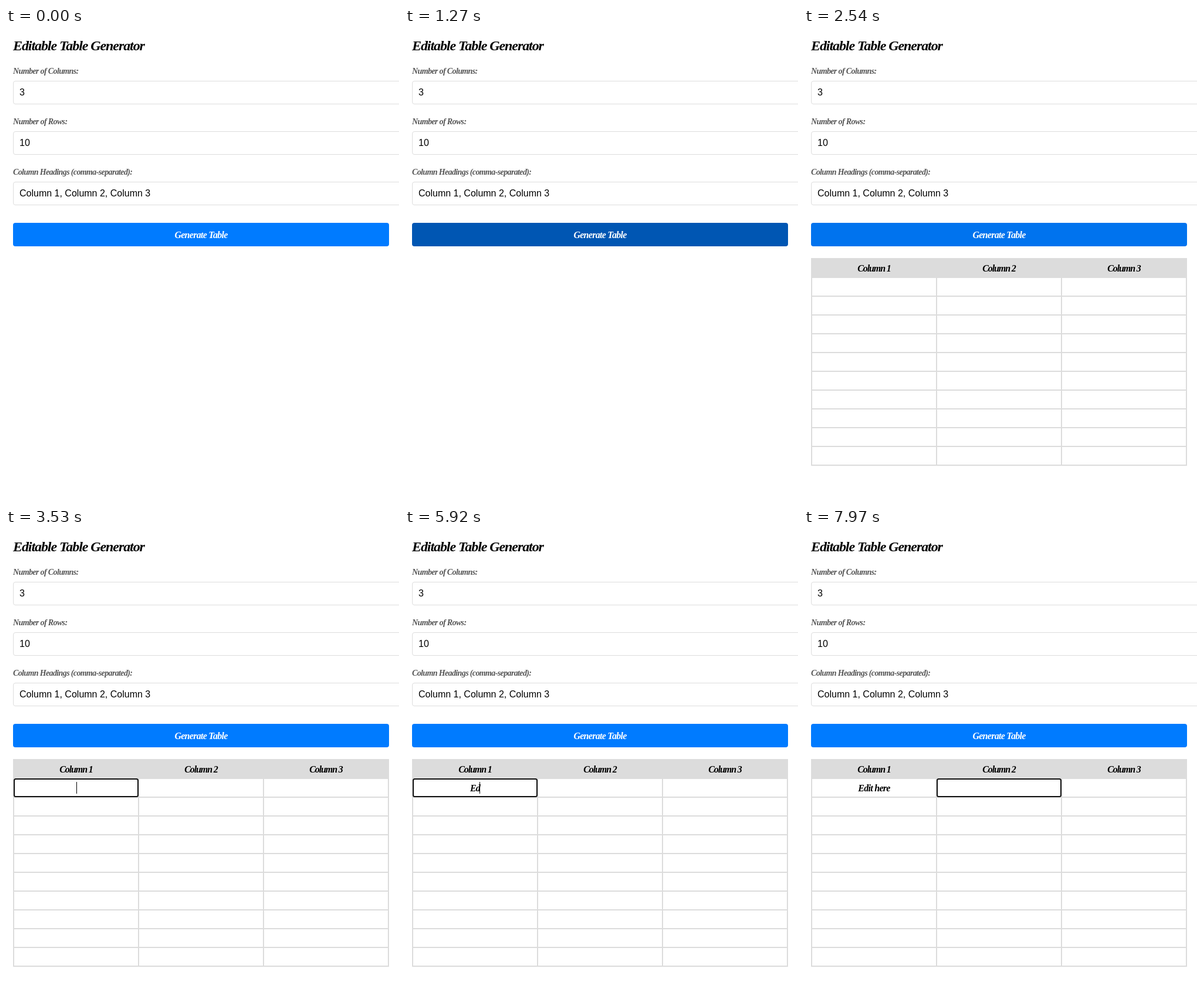
These frames come from a looping animation (670x806 px, 8000 ms). An HTML page:

```html
<!DOCTYPE html>
<html lang="en">
<head>
<meta charset="utf-8">
<title>Editable Table Generator</title>
<style>
  html, body { margin: 0; width: 100%; height: 100%; overflow: hidden; background: #fff; }
  svg { display: block; width: 670px; height: 806px; }
  text { white-space: pre; }
  .script { font: italic bold 16px "Liberation Serif", serif; letter-spacing: -.045em; }
  .script.title { font-size: 24px; }
  .script.label { font-size: 14px; fill: #555; }
  .script.head { letter-spacing: -.07em; }
  .value { font: 16px "Liberation Sans", Arial, sans-serif; }
  .mid { text-anchor: middle; }
</style>
</head>
<body>
<svg id="stage" viewBox="0 0 670 806"></svg>
<script>
const LOOP = 8000;
const stage = document.getElementById('stage');

function add(tag, attrs, parent = stage, text = '') {
  const el = document.createElementNS('http://www.w3.org/2000/svg', tag);
  for (const key in attrs) el.setAttribute(key, attrs[key]);
  el.textContent = text;
  parent.appendChild(el);
  return el;
}
const write = (cls, x, y, text, parent, fill = '#000') =>
  add('text', { class: cls, x, y, fill }, parent, text);
const show = (el, on) => el.setAttribute('visibility', on ? 'visible' : 'hidden');

// Form
write('script title', 12, 38, 'Editable Table Generator');
[
  ['Number of Columns:', '3'],
  ['Number of Rows:', '10'],
  ['Column Headings (comma-separated):', 'Column 1, Column 2, Column 3']
].forEach(([label, value], i) => {
  const y = 86 * i;
  write('script label', 12, y + 78, label);
  add('rect', { x: 12.5, y: y + 90.5, width: 700, height: 39, rx: 3.5, fill: '#fff', stroke: '#ddd' });
  write('value', 23, y + 115, value);
});
const button = add('rect', { x: 12, y: 332, width: 641, height: 40, rx: 4 });
write('script mid', 332.5, 358, 'Generate Table', stage, '#fff');

// Table
const table = add('g', {});
add('rect', { x: 12, y: 392, width: 641, height: 34, fill: '#dcdcdc' }, table);
let grid = '';
for (let c = 0; c < 4; c++) grid += `M${13 + 213 * c} 425V746`;
for (let r = 1; r <= 10; r++) grid += `M12 ${425 + 32 * r}H653`;
add('path', { d: grid, stroke: '#dcdcdc', 'stroke-width': 2 }, table);
for (let c = 0; c < 3; c++) write('script head mid', 119.5 + 213 * c, 415, `Column ${c + 1}`, table);
const cell = write('script mid', 119.5, 447, '', table);
const focus = add('rect', {
  y: 426, width: 211, height: 30, rx: 2.5, fill: 'none', stroke: '#101010', 'stroke-width': 2
}, table);
const caret = add('rect', { y: 431, width: 1, height: 20, fill: '#000' }, table);

// CSS "ease" timing: cubic-bezier(.25, .1, .25, 1)
function ease(p) {
  if (p <= 0) return 0;
  if (p >= 1) return 1;
  const curve = (a, b, s) => 3 * a * s * (1 - s) ** 2 + 3 * b * s * s * (1 - s) + s ** 3;
  let lo = 0, hi = 1;
  for (let i = 0; i < 24; i++) {
    const s = (lo + hi) / 2;
    if (curve(.25, .25, s) < p) lo = s; else hi = s;
  }
  return curve(.1, 1, lo);
}

// The button colour is refreshed in steps of about 70 ms.
const stepped = (t, from, size) => from + Math.floor((t - from) / size) * size;

function hover(t) {
  if (t < 1000) return 0;
  if (t < 2470) return ease((stepped(t, 1000, 67.5) - 973) / 300);
  return 1 - ease((stepped(t, 2470, 70) - 2396) / 300);
}

const PHRASE = 'Edit\u00a0here';
const keys = [[5720, 1], [5920, 2], [6120, 3], [6250, 4], [6380, 5], [6770, 7], [6910, 8], [6980, 9]];

function caretOn(t) {
  if (t < 3530) return false;
  if (t < 5580) return t < 4060 || (t >= 4520 && t < 5050);
  return t < 7970;
}

function draw(t) {
  const h = hover(t);
  const mix = (a, b) => Math.round(a + (b - a) * h);
  button.setAttribute('fill', `rgb(0,${mix(123, 86)},${mix(255, 179)})`);

  show(table, t >= 2210);
  if (t < 2210) {
    focus.setAttribute('visibility', 'hidden');
    caret.setAttribute('visibility', 'hidden');
    cell.textContent = '';
    return;
  }
  const count = keys.reduce((n, [at, len]) => t >= at ? len : n, 0);
  cell.textContent = PHRASE.slice(0, count);

  const second = t >= 7440;
  show(focus, t >= 3530);
  focus.setAttribute('x', second ? 227 : 14);
  const end = count ? Math.round(118 + cell.getComputedTextLength() / 2) : 120;
  caret.setAttribute('x', second ? 333 : end);
  show(caret, caretOn(t));
}

const start = performance.now();
function tick() {
  draw((performance.now() - start) % LOOP);
  requestAnimationFrame(tick);
}
draw(0);
requestAnimationFrame(tick);
</script>
</body>
</html>
```
